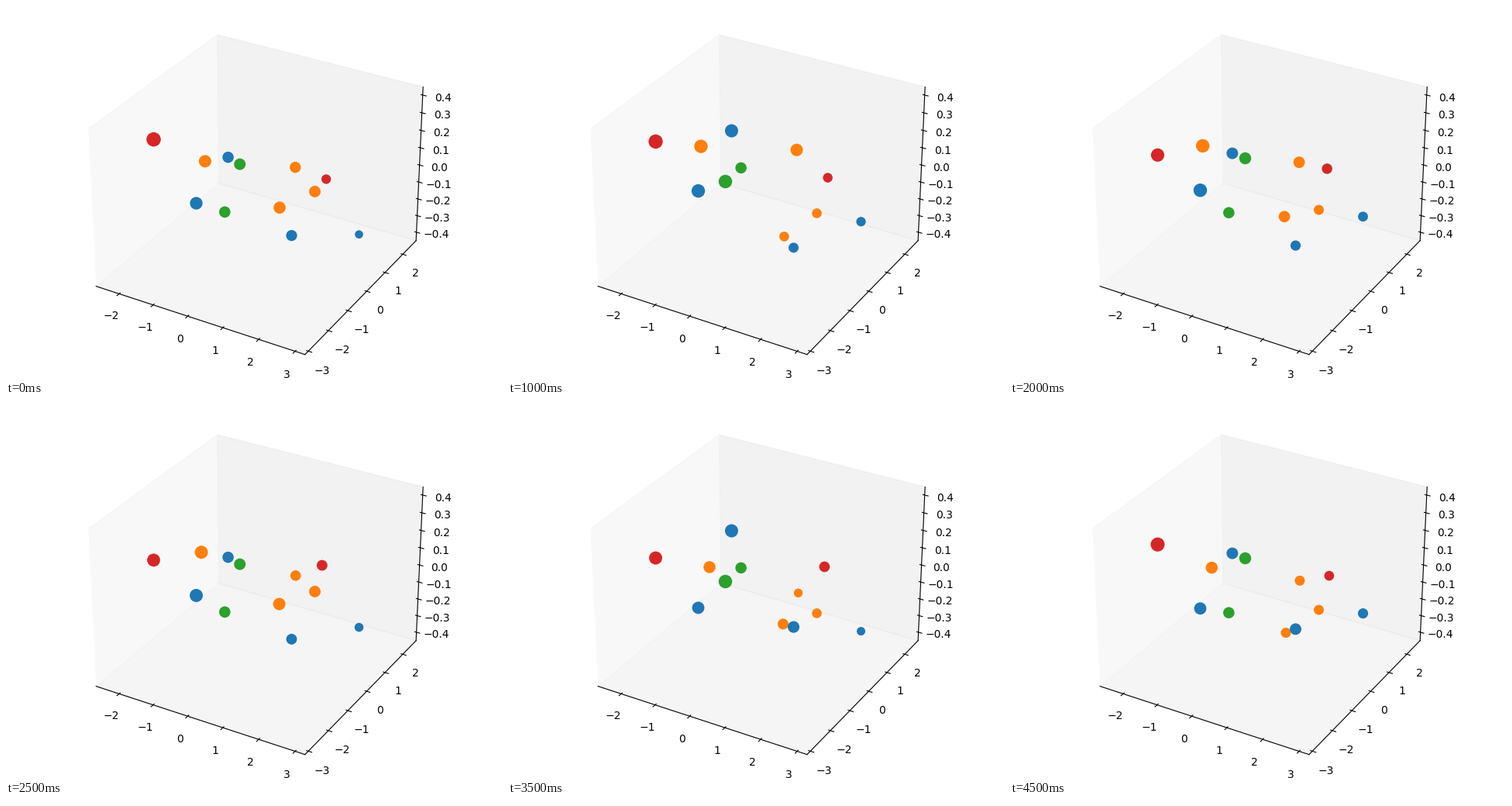
These frames come from a looping animation (640 by 480 pixels, 5000 ms). A matplotlib script:

```python
import matplotlib.pyplot as plt
import numpy as np
from matplotlib.animation import FuncAnimation

W, H, DPI = 640, 480, 100
STEPS, STEP_MS = 10, 500

fig = plt.figure(figsize=(W / DPI, H / DPI), dpi=DPI)

box = fig.add_axes([0, 0, 1, 1], projection="3d")
box.set(xlim=(-2.689, 3.27), ylim=(-3.16, 2.77), zlim=(-0.4508, 0.4453))
box.grid(False)

# The atoms live on a flat layer measured in stage pixels.
stage = fig.add_axes([0, 0, 1, 1])
stage.set(xlim=(0, W), ylim=(H, 0))
stage.axis("off")


class Atom:
    """A ball that vibrates along one line through its place of rest."""

    def __init__(self, color, rest, swing, cycles, phase):
        self.color = "tab:" + color
        self.rest = np.array(rest) + 0.5
        self.swing = np.array(swing)
        self.cycles = cycles
        self.phase = np.radians(phase)

    def place(self, step):
        angle = 2 * np.pi * self.cycles * step / STEPS + self.phase
        return self.rest + self.swing * np.sin(angle)

    def radius(self, step):
        # The molecule tilts down to the right; lower balls are smaller.
        rise = self.rest[1] - self.place(step)[1]
        return np.sqrt(0.57 * (190 - 0.28 * self.rest[0] + rise))


atoms = [
    Atom("red", (190, 185), (0, 15), 1, 243),
    Atom("red", (410, 214), (3, 10), 1, 63),
    Atom("orange", (254, 194), (7, 17), 1, 160),
    Atom("orange", (373, 213), (1, 28), 1, 191),
    Atom("orange", (398, 258), (0, 22), 2, 240),
    Atom("orange", (354, 276), (2, 22), 1.67, 312),
    Atom("blue", (287, 178), (-1, 18), 2, 112),
    Atom("green", (303, 196), (-3, 13), 4, 144),
    Atom("green", (281, 248), (1, 22), 2, 128),
    Atom("blue", (245, 249), (0, 14), 1, 159),
    Atom("blue", (368, 298), (0, 15), 1, -9),
    Atom("blue", (455, 281), (0, 14), 1.7, 71),
]
dots = stage.scatter(*np.transpose([a.rest for a in atoms]),
                     c=[a.color for a in atoms], linewidths=0)


def draw(step):
    radii = np.array([a.radius(step) for a in atoms])
    dots.set_offsets([a.place(step) for a in atoms])
    dots.set_sizes((2 * radii * 72 / DPI) ** 2)
    return (dots,)


anim = FuncAnimation(fig, draw, frames=STEPS, interval=STEP_MS, repeat=True)
plt.show()
```
